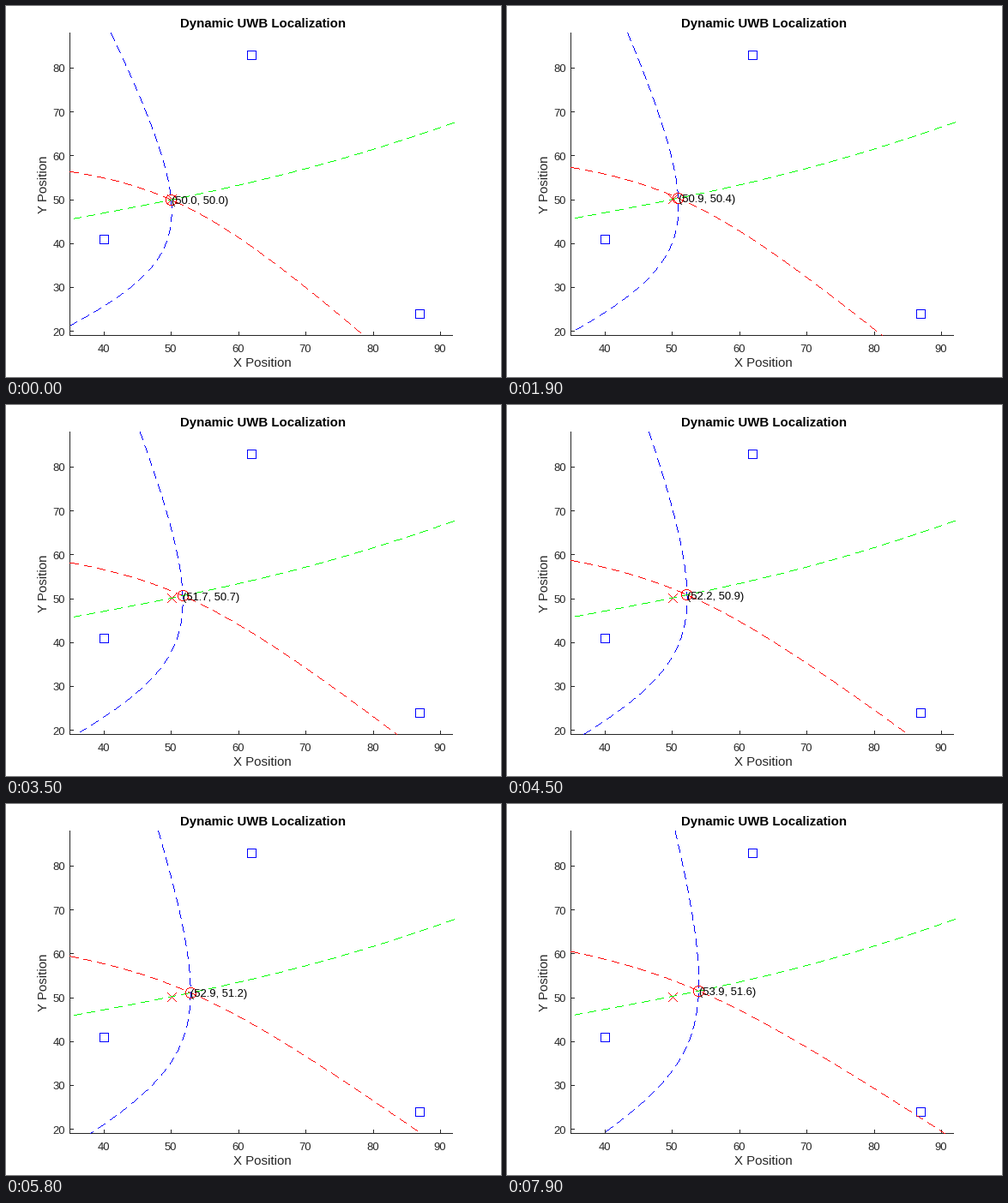
Animation, 577 px wide and 433 px high, one loop 8000 ms. Source, as a matplotlib script:

```python
import numpy as np
import matplotlib.pyplot as plt
from matplotlib.animation import FuncAnimation

W, H, DPI = 577, 433, 100
PT = 72 / DPI                       # points per pixel
LEFT, BOTTOM = 74.8, 384.9
X_MIN, X_MAX, Y_MIN, Y_MAX = 35, 92, 19, 88
X_SCALE, Y_SCALE = 447.4 / (X_MAX - X_MIN), 353.3 / (Y_MAX - Y_MIN)
DASH, PERIOD = 10, 16
RED, GREEN, BLUE = (255, 0, 0), (0, 255, 0), (0, 0, 255)
GRAY = (38, 38, 38)

ANCHORS = np.array([(40, 41), (62, 83), (87, 24)], float)
PAIRS = [(0, 1, RED), (0, 2, BLUE), (1, 2, GREEN)]
START, END, STEPS = np.array([50, 50]), np.array([55, 52]), 99
FIRST_FIX = (50.15, 50.1)
FRAMES, INTERVAL = 80, 100

plt.rcParams["font.family"] = "Liberation Sans"
fig = plt.figure(figsize=(W / DPI, H / DPI), dpi=DPI, facecolor="white")
ax = fig.add_axes([0, 0, 1, 1])
ax.axis("off")


def px(x):
    return LEFT + (x - X_MIN) * X_SCALE


def py(y):
    return BOTTOM - (y - Y_MIN) * Y_SCALE


def pixel(x, y):
    return int(px(x)), int(py(y))


def label(x, y, text, size, color="#262626", **kw):
    kw = {"ha": "center", "va": "baseline", **kw}
    return ax.text(x, y, text, fontsize=size * PT, color=color, **kw)


def stroke(canvas, xs, ys, color, dashed=False):
    """Draw a densely sampled curve one hard pixel wide."""
    dx, dy = np.diff(xs), np.diff(ys)
    crosses_row = np.diff(np.floor(ys - 0.5)) != 0
    crosses_col = np.diff(np.floor(xs - 0.5)) != 0
    keep = np.where(np.abs(dy) > np.abs(dx), crosses_row, crosses_col)
    keep = np.append(True, keep)
    if dashed:
        travelled = np.append(0, np.cumsum(np.hypot(dx, dy)))
        keep &= travelled % PERIOD < DASH
    canvas[ys[keep].astype(int), xs[keep].astype(int)] = color


def square(canvas, x, y, color, r=5):
    col, row = pixel(x, y)
    canvas[[row - r, row + r], col - r:col + r + 1] = color
    canvas[row - r:row + r + 1, [col - r, col + r]] = color


def cross(canvas, x, y, color, r=5):
    col, row = pixel(x, y)
    k = np.arange(-r, r + 1)
    canvas[row + k, col + k] = color
    canvas[row - k, col + k] = color


def circle(canvas, x, y, color, r=6.2):
    col, row = pixel(x, y)
    a = np.linspace(0, 2 * np.pi, 721)
    stroke(canvas, col + 0.5 + r * np.cos(a), row + 0.5 + r * np.sin(a), color)


def hyperbola(near, far, point):
    """Branch around `near` through `point`, cut to the plot area, in pixels."""
    dist = np.linalg.norm
    a = (dist(point - far) - dist(point - near)) / 2
    c = dist(near - far) / 2
    b = np.sqrt(c * c - a * a)
    u = (near - far) / (2 * c)
    v = np.array([-u[1], u[0]])
    t = np.linspace(-4, 4, 40000)[:, None]
    x, y = ((near + far) / 2 + a * np.cosh(t) * u + b * np.sinh(t) * v).T
    inside = (x >= X_MIN) & (x <= X_MAX) & (y >= Y_MIN) & (y <= Y_MAX)
    return px(x[inside]), py(y[inside])


# Static layer: axes, ticks, captions, anchors
base = np.full((H, W, 3), 255, np.uint8)
base[384, 74:521] = GRAY
base[31:385, 74] = GRAY
for value in range(40, 91, 10):
    col = int(px(value))
    base[380:384, col] = GRAY
    label(col, 403.5, str(value), 13)
for value in range(20, 81, 10):
    base[int(py(value)), 75:79] = GRAY
    label(69, py(value) + 4.8, str(value), 13, ha="right")
label(299.5, 25, "Dynamic UWB Localization", 15, "black", weight="bold")
label(299, 421, "X Position", 15)
label(47.5, 208.5, "Y Position", 15, rotation=90, rotation_mode="anchor")
for anchor in ANCHORS:
    square(base, *anchor, BLUE)
cross(base, *FIRST_FIX, RED)

image = ax.imshow(base, extent=(0, W, H, 0), aspect="auto",
                  interpolation="nearest")
readout = label(0, 0, "", 13, "black", ha="left")


def update(frame):
    # The tag rests for one frame early in its path.
    step = frame if frame < 8 else frame - 1
    pos = START + (END - START) * step / STEPS
    canvas = base.copy()
    for i, j, color in PAIRS:
        stroke(canvas, *hyperbola(ANCHORS[i], ANCHORS[j], pos), color, dashed=True)
    circle(canvas, *pos, RED)
    image.set_data(canvas)
    readout.set_position((px(pos[0]) + 0.3, py(pos[1]) + 5))
    readout.set_text(f"({pos[0]:.1f}, {pos[1]:.1f})")
    return image, readout


anim = FuncAnimation(fig, update, frames=FRAMES, interval=INTERVAL,
                     repeat=True, repeat_delay=0)
plt.show()
```
